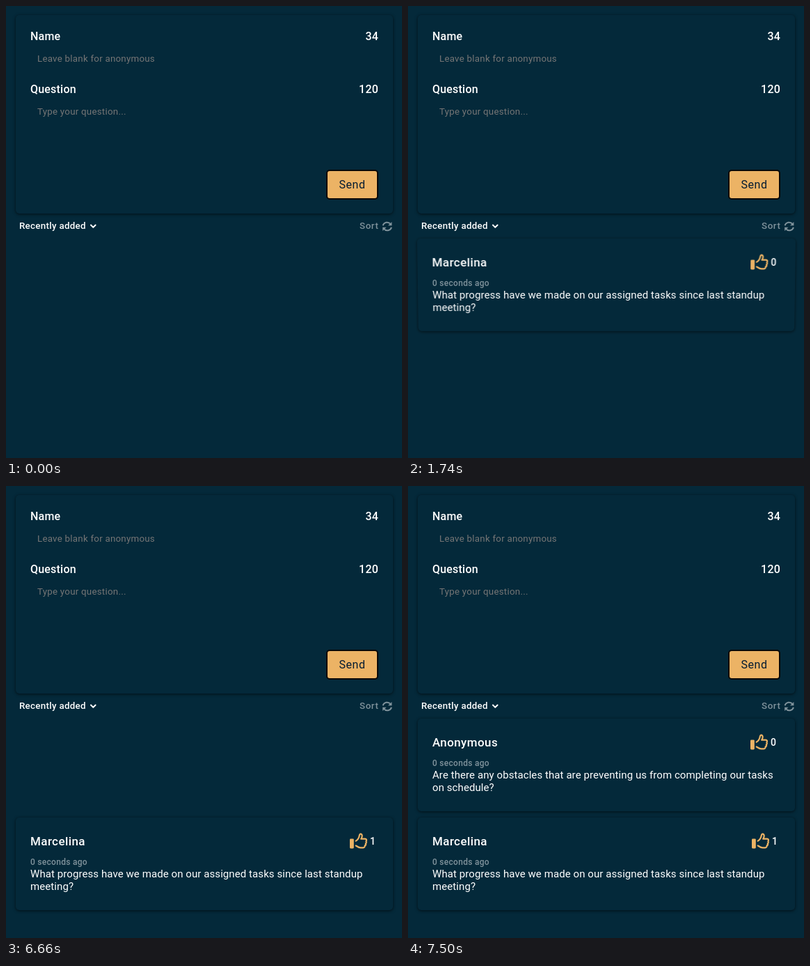
An HTML page for the animation above (8000 ms loop, 569x649 px).

```html
<!DOCTYPE html>
<html lang="en">
<head>
<meta charset="utf-8">
<title>Questions</title>
<style>
  html, body { margin: 0; width: 100%; height: 100%; overflow: hidden; background: #04293a; }
  #stage { position: relative; width: 569px; height: 649px; overflow: hidden; color: #fff;
    font: 16px/20px Roboto, sans-serif; white-space: nowrap; }
  #stage * { position: absolute; box-sizing: border-box; }
  .panel { left: 14px; width: 542px; border-radius: 5px; background: #04293a;
    box-shadow: 0 1px 4px rgba(0, 0, 0, .65); }
  .form { top: 13px; height: 285px; }
  .card { top: 334px; height: 133px; opacity: 0; }
  .label { left: 21px; font-weight: 500; letter-spacing: .2px; }
  .left { right: 21px; font-weight: 500; letter-spacing: .2px; }
  .hint { left: 31px; font-size: 13.33px; letter-spacing: .24px; color: #757575; }
  .send { left: 446px; top: 222px; width: 75px; height: 43px; border: 2px solid #080808;
    border-radius: 5px; background: #ecb365; color: #041c32; text-align: center;
    line-height: 40px; letter-spacing: .6px; }
  .bar { top: 306px; font-size: 13.33px; font-weight: 500; letter-spacing: .3px; }
  .sort { left: 508px; letter-spacing: .6px; color: #7f929b; }
  .name { left: 21px; top: 24px; font-size: 17px; font-weight: 500; letter-spacing: .4px; }
  .ago { left: 21px; top: 54px; font-size: 12px; font-weight: 500; letter-spacing: .27px;
    color: #80939c; }
  .text { left: 21px; top: 72px; font-size: 15px; line-height: 18px; letter-spacing: .08px; }
  .likes { left: 478px; top: 22px; width: 50px; height: 26px; }
  .likes b { left: 29px; top: 2px; font-size: 14px; font-weight: 500; }
  .likes.one { left: 480px; }
  svg { fill: none; overflow: visible; }
</style>
</head>
<body>
<div id="stage">
  <div class="panel form">
    <span class="label" style="top:21px">Name</span><span class="left" style="top:21px">34</span>
    <span class="hint" style="top:53px">Leave blank for anonymous</span>
    <span class="label" style="top:97px">Question</span><span class="left" style="top:97px">120</span>
    <span class="hint" style="top:129px">Type your question...</span>
    <div class="send">Send</div>
  </div>
  <span class="bar" style="left:19px">Recently added</span>
  <svg style="left:121px;top:313px" width="9" height="7" stroke="#fff" stroke-width="2"
    stroke-linecap="round" stroke-linejoin="round"><path d="M1 1.5 4.3 4.9 7.6 1.5"/></svg>
  <span class="bar sort">Sort</span>
  <svg style="left:540px;top:309px" width="15" height="15" stroke="#7f929b" stroke-width="2">
    <g id="arrow"><path d="M1.6 6.3A6.2 6.2 0 0 1 12.6 4.3"/><path d="M14.4 .9V6.3H9Z" fill="#7f929b" stroke="none"/></g>
    <use href="#arrow" transform="rotate(180 7.75 7.5)"/>
  </svg>
</div>
<script>
const LOOP = 8000, FLIP = 840;
const stage = document.getElementById('stage');

const likes = n => `<div class="likes ${n ? 'one' : 'zero'}">
  <svg width="26" height="24" stroke="#ecb365" stroke-width="2.2" stroke-linejoin="round" stroke-linecap="round">
    <rect x="0" y="8.4" width="5.8" height="14" rx="1.3" fill="#ecb365" stroke="none"/>
    <path d="M8.7 11.6C11.3 10 13.4 6.6 13.9 3.3 14.2 1.4 16.1 1 17.1 2.3 18.3 4.1 17.5 6.4 16.2 8.7H22
      C24.1 8.7 24.6 10.9 23.3 12.1 24.2 13.2 23.9 14.6 22.8 15.3 23.3 16.6 22.8 17.8 21.6 18.3
      21.9 19.9 20.9 21.3 19.2 21.3H15.6C12.6 21.3 10.7 19.7 8.7 18.3"/>
  </svg><b>${n}</b></div>`;

function addCard(name, text, counts) {
  const card = document.createElement('div');
  card.className = 'panel card';
  card.innerHTML = `<span class="name">${name}</span><span class="ago">0 seconds ago</span>
    <span class="text">${text}</span>` + counts.map(likes).join('');
  stage.append(card);
  return card;
}

const play = (el, frames) => el.animate(
  frames.map(([ms, style, easing = 'linear']) => ({ offset: ms / LOOP, easing, ...style })),
  { duration: LOOP, iterations: Infinity });

// Hard switch of one property at a given time
const jump = (el, prop, ms, from, to) => play(el, [
  [0, { [prop]: from }], [ms, { [prop]: from }], [ms, { [prop]: to }], [LOOP, { [prop]: to }]]);

// Swing around the horizontal axis while fading in
function flipIn(el, start) {
  const at = part => start + part * FLIP;
  const turn = deg => ({ transform: `perspective(400px) rotateX(${deg}deg)` });
  play(el, [
    [0, turn(90)],
    [start, turn(90), 'ease-in'],
    [at(.4), turn(-20), 'ease-in'],
    [at(.6), turn(10), 'ease'],
    [at(.8), turn(-5), 'ease'],
    [at(1), turn(0)],
    [at(1), { transform: 'none' }],
    [LOOP, { transform: 'none' }]]);
  play(el, [
    [0, { opacity: 0 }], [start, { opacity: 0 }, 'ease-in'],
    [at(.6), { opacity: 1 }], [LOOP, { opacity: 1 }]]);
}

const first = addCard('Marcelina',
  'What progress have we made on our assigned tasks since last standup<br>meeting?', [0, 1]);
const second = addCard('Anonymous',
  'Are there any obstacles that are preventing us from completing our tasks<br>on schedule?', [0]);

flipIn(first, 1162);
flipIn(second, 6660);
jump(first.querySelector('.zero'), 'opacity', 5760, 1, 0);
jump(first.querySelector('.one'), 'opacity', 5760, 0, 1);
jump(first, 'top', 6660, '334px', '476px');
</script>
</body>
</html>
```
